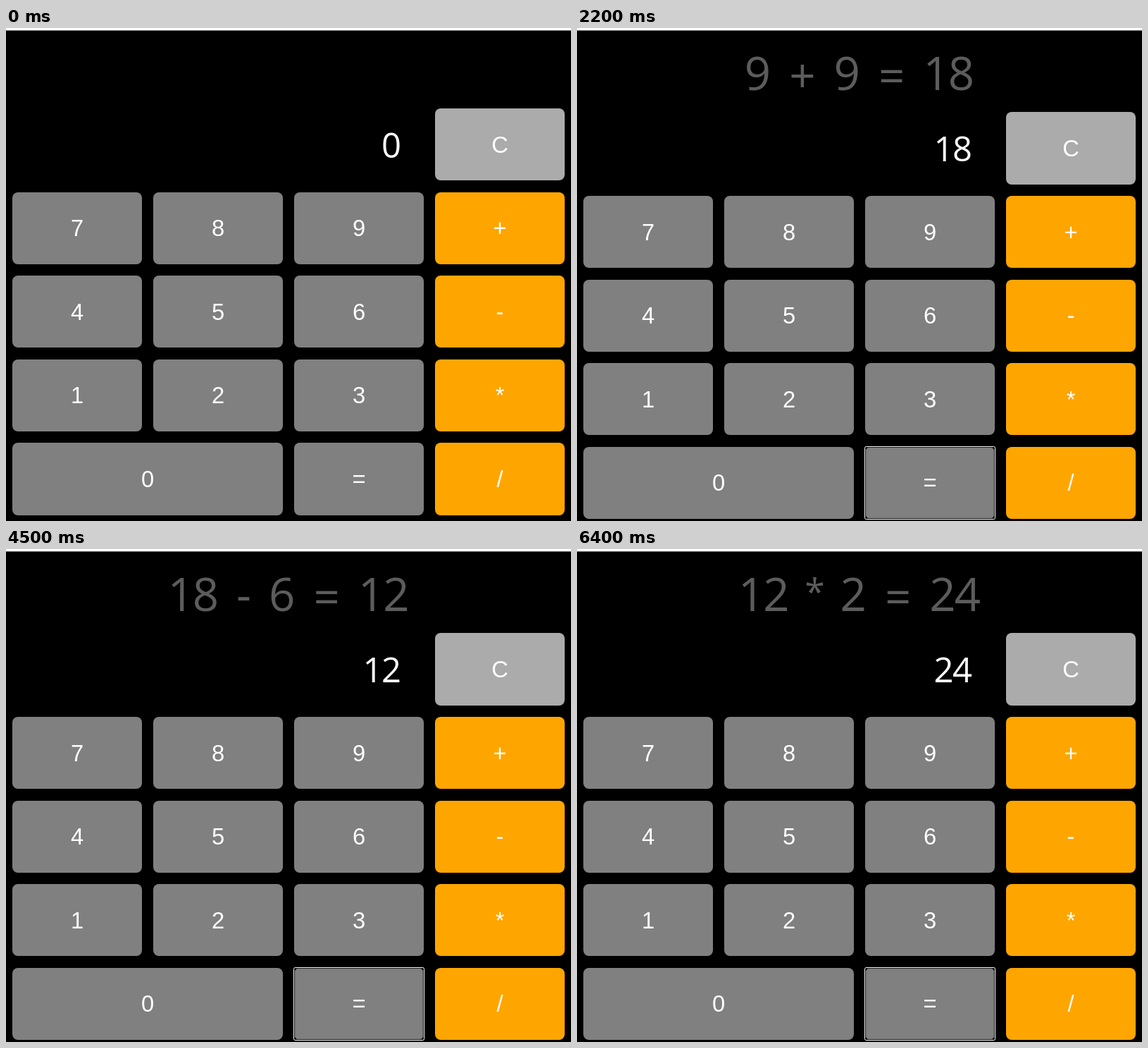
Write an HTML page with a canvas that moves like this. It is 802 px wide and 699 px high and loops after 8 s.

```html
<!DOCTYPE html>
<html lang="en">
<head>
<meta charset="utf-8">
<title>Calculator</title>
<style>
html, body { margin: 0; width: 100%; height: 100%; overflow: hidden; background: #000; }
canvas { display: block; width: 802px; height: 699px; }
</style>
</head>
<body>
<canvas id="stage" width="802" height="699"></canvas>
<script>
const ctx = document.getElementById('stage').getContext('2d');
const LOOP = 8000;
const GRAY = '#808080', ORANGE = '#ffa500', LIGHT = '#ababab';

// Each step: start time, focused key, result, history line
const steps = [
  [0, '', '0', ''],
  [500, '9', '9', ''],
  [1200, '+', '9', ''],
  [1600, '9', '9', ''],
  [2200, '=', '18', '9 + 9 = 18'],
  [3200, '-', '18', '9 + 9 = 18'],
  [3700, '6', '18', '9 + 9 = 18'],
  [3800, '6', '6', '9 + 9 = 18'],
  [4400, '=', '6', '9 + 9 = 18'],
  [4500, '=', '12', '18 - 6 = 12'],
  [5400, '*', '12', '18 - 6 = 12'],
  [6000, '2', '2', '18 - 6 = 12'],
  [6400, '=', '24', '12 * 2 = 24']
];

// A space extends the key before it over the next column
const rows = ['   C', '789+', '456-', '123*', '0 =/'];
const keys = [];
rows.forEach((row, r) => [...row].forEach((label, c) => {
  if (label === ' ') return;
  const span = label === '0' ? 2 : 1;
  const color = label === 'C' ? LIGHT : c === 3 ? ORANGE : GRAY;
  keys.push({ label, r, x: 9 + 200 * c, w: 200 * span - 16, color });
}));

// Glyph advances in em
const advance = { ' ': 0.357, '+': 0.684, '=': 0.684, '-': 0.4, '*': 0.417 };
const adv = ch => advance[ch] || 0.543;
const lineWidth = (text, size) => [...text].reduce((sum, ch) => sum + adv(ch) * size, 0);

function drawLine(text, x, baseline, size, color) {
  ctx.fillStyle = color;
  ctx.textAlign = 'center';
  for (const ch of text) {
    const star = ch === '*';
    const w = adv(ch) * size;
    const dy = star ? -9.5 : '+='.includes(ch) ? 2.5 : 0;
    ctx.font = `${star ? size * 0.78 : size}px "Open Sans", "Noto Sans", sans-serif`;
    ctx.fillText(ch, x + w / 2, baseline + dy);
    x += w;
  }
}

function ring(x, y, w, h, radius, color) {
  ctx.strokeStyle = color;
  ctx.lineWidth = 1;
  ctx.beginPath();
  ctx.roundRect(x, y, w, h, radius);
  ctx.stroke();
}

function drawKey({ label, r, x, w, color }, shift, focused) {
  const top = 113.95 + 118.6 * r + shift;
  const y = Math.round(top);
  const h = Math.round(top + 102.2) - y;
  ctx.fillStyle = color;
  ctx.beginPath();
  ctx.roundRect(x, y, w, h, 8);
  ctx.fill();
  if (focused) {
    ring(x + 0.5, y + 0.5, w - 1, h - 1, 1, '#101010');
    ring(x - 0.5, y - 0.5, w + 1, h + 1, 2, '#fff');
  }
  ctx.fillStyle = '#fff';
  ctx.font = '32.7px "Liberation Sans", Arial, sans-serif';
  ctx.textAlign = 'center';
  ctx.fillText(label, x + w / 2, Math.round(top + 62.6));
}

function draw(t) {
  const [, focus, result, history] = steps.findLast(step => step[0] <= t);
  const shift = history ? 5.4 : 0;
  ctx.fillStyle = '#000';
  ctx.fillRect(0, 0, 802, 699);
  ctx.fillStyle = '#fff';
  ctx.fillRect(0, 0, 802, 3.5);
  drawLine(history, 401 - lineWidth(history, 65.3) / 2, 88, 65.3, '#5c5c5c');
  drawLine(result, 560.3 - lineWidth(result, 49), history ? 189 : 184, 49, '#fff');
  for (const key of keys) drawKey(key, shift, key.label === focus);
}

const start = performance.now();
function tick() {
  draw((performance.now() - start) % LOOP);
  requestAnimationFrame(tick);
}
tick();
</script>
</body>
</html>
```
